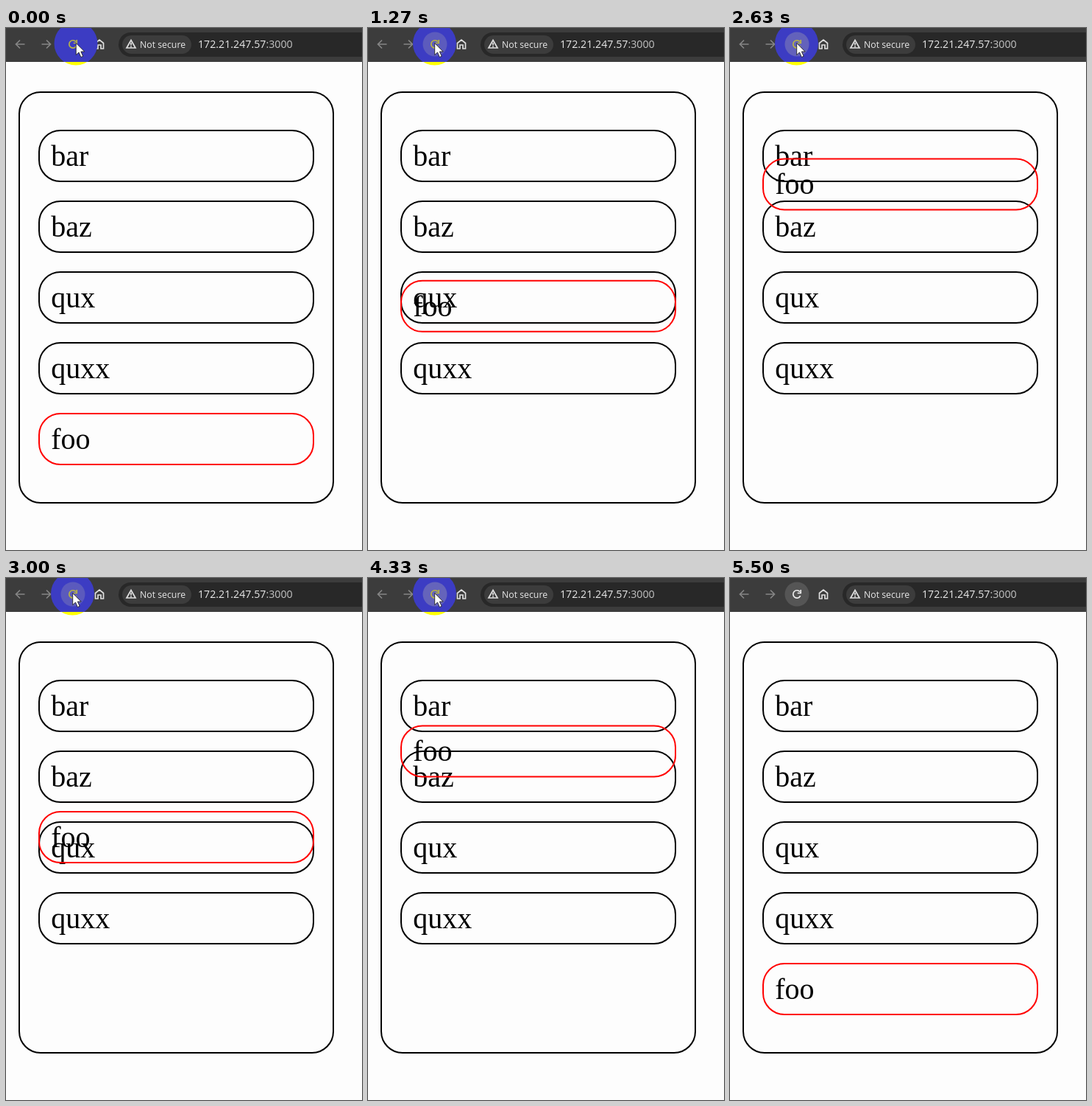
These frames come from a looping animation (484 px wide and 708 px high, 5.53 s). An HTML page:

```html
<!DOCTYPE html>
<html lang="en">
<head>
<meta charset="utf-8">
<title>List transition</title>
<style>
  html, body { margin: 0; width: 100%; height: 100%; overflow: hidden; background: #fdfdfd; }
  svg { display: block; }
  .ui { font-family: "Open Sans", "Noto Sans", sans-serif; fill: #e8e8e8; }
  .icon { fill: none; stroke: #dedede; stroke-width: 1.7; }
  .dim { stroke: #858585; }
  .box { fill: none; stroke: #000; stroke-width: 2; }
  .item text { font: 40px "Liberation Serif", "Times New Roman", serif; fill: #000; }
  #foo .box { stroke: #f00; }
</style>
</head>
<body>
<svg width="484" height="708" viewBox="0 0 484 708">
  <rect class="box" x="18" y="87" width="427" height="557" rx="29"/>
  <g id="list"></g>

  <circle class="spot" cy="21" r="29.5" fill="#ff0"/>
  <svg width="484" height="46">
    <rect width="484" height="46" fill="#3c3c3c"/>
    <rect x="153" y="6" width="380" height="33" rx="16.5" fill="#282828"/>
    <rect x="158" y="10" width="94" height="25" rx="12.5" fill="#3c3c3c"/>
    <path class="icon dim" d="M25.5 22H13.5M19 16.5L13.5 22L19 27.5"/>
    <path class="icon dim" d="M48.5 22H60.5M55 16.5L60.5 22L55 27.5"/>
    <path class="icon" d="M121.5 20.5L127 16L132.5 20.5V28H129V23H125V28H121.5Z"/>
    <path class="icon" d="M170 16.5L176 27H164ZM170 20V23.5M170 24.5V26"/>
    <text class="ui" x="182" y="27" font-size="12.3">Not secure</text>
    <text class="ui" x="261" y="27" font-size="14.2">172.21.247.57<tspan fill="#c4c4c4">:3000</tspan></text>
    <circle class="spot" cy="21" r="29.5" fill="#3c3cc3"/>
    <circle id="hover" cx="91" cy="22" r="16.5"/>
    <g id="reload" class="icon">
      <path d="M95.700 24.200A5.200 5.200 0 1 1 95 18.600"/>
      <path d="M96.200 16V20.500H91.700"/>
    </g>
  </svg>
  <path id="cursor" d="M0 0V16L3.800 12.500L6.700 19L9.500 17.800L6.700 11.500H11.500Z" fill="#fff" stroke="#222" stroke-width=".9"/>
</svg>
<script>
const LOOP = 5530, TOP = 138, BOTTOM = 522;
// start and duration of each slide of the red item
const slides = [[738, 1004], [2529, 1018], [4171, 1000]];
const clicks = [500, 2200, 3930];
const $ = id => document.getElementById(id);
const clamp = v => Math.max(0, Math.min(1, v));

const item = (name, y) => `<g class="item" id="${name}" transform="translate(44 ${y})">
  <rect class="box" x="1" y="1" width="373" height="69" rx="29"/>
  <text x="17.3" y="49">${name}</text></g>`;
$("list").innerHTML = ["bar", "baz", "qux", "quxx", "foo"].map((n, i) => item(n, TOP + 96 * i)).join("");

const spots = document.querySelectorAll(".spot");

function draw(t) {
  const [start, time] = slides.filter(s => s[0] <= t).pop() ?? [-LOOP, 1000];
  const y = TOP + (BOTTOM - TOP) * clamp((t - start) / time);
  $("foo").setAttribute("transform", `translate(44 ${y})`);

  // pointer slides onto the reload button and is gone at the end of the loop
  const away = t >= 5500;
  const slide = clamp((t - 20) / 110);
  const x = 95 - 4.5 * slide;
  const visible = away ? "hidden" : "visible";
  for (const s of spots) {
    s.setAttribute("cx", x);
    s.setAttribute("visibility", visible);
  }
  $("cursor").setAttribute("transform", `translate(${x + .2} 20.5)`);
  $("cursor").setAttribute("visibility", visible);

  // button highlight, a little stronger after each click
  const click = clicks.filter(c => c <= t).pop() ?? -LOOP;
  const age = t - click;
  const press = clamp(age / 150) * clamp((800 - age) / 500);
  $("hover").setAttribute("fill", away ? "#555" : "#8a88b4");
  $("hover").setAttribute("fill-opacity", away ? 1 : slide * (.4 + .15 * press));
  $("reload").style.stroke = away ? "#eee" : "#bab644";
}

function tick(now) {
  draw(now % LOOP);
  requestAnimationFrame(tick);
}
draw(0);
requestAnimationFrame(tick);
</script>
</body>
</html>
```
